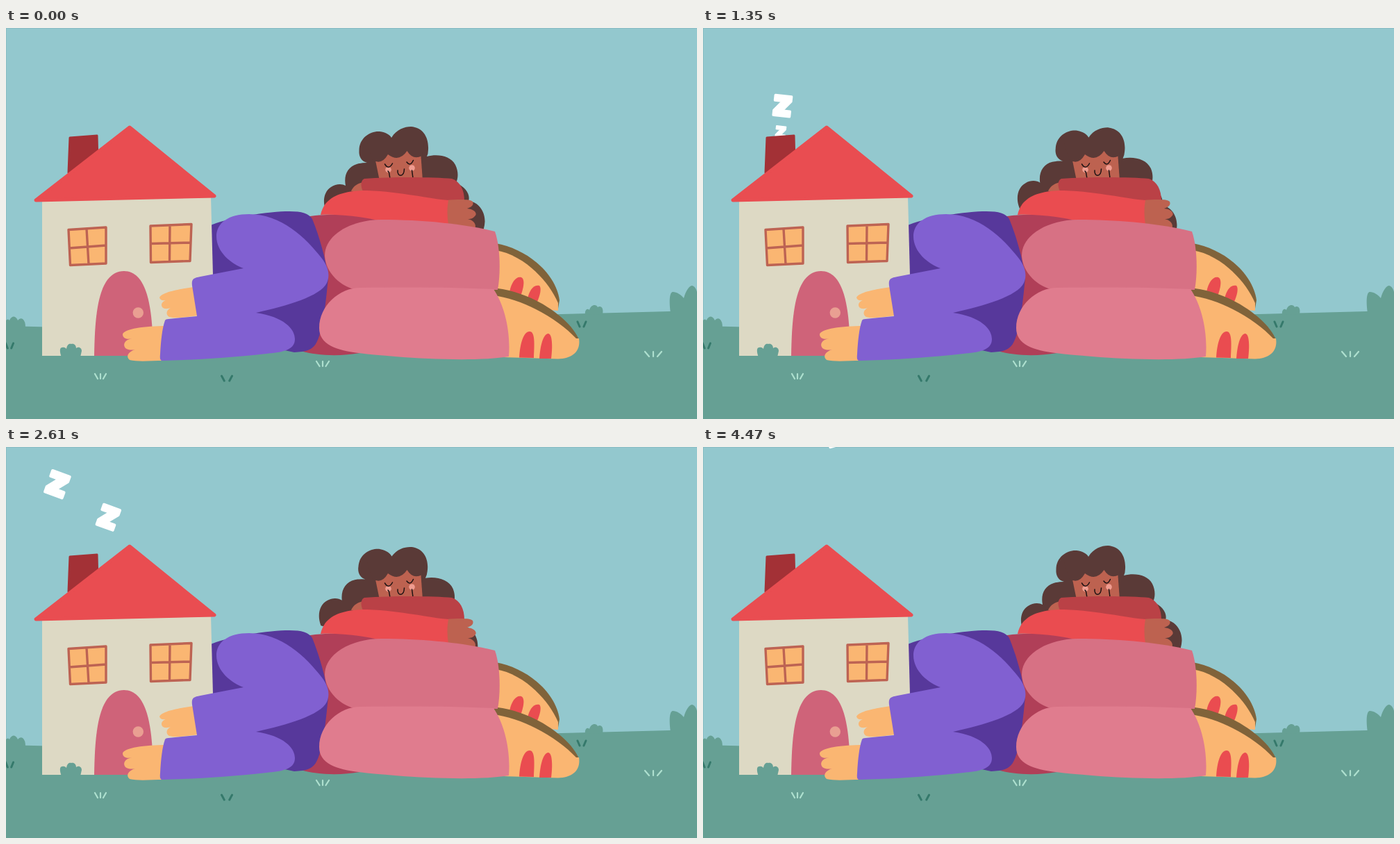
Recreate the animation shown at these times as an HTML page. Size 995 by 563 pixels, loop 4500 ms.

```html
<!DOCTYPE html>
<html lang="en">
<head>
<meta charset="utf-8">
<title>Sleepy house</title>
<style>
html, body { margin: 0; width: 100%; height: 100%; overflow: hidden; background: #93c8ce; }
svg { display: block; width: 100vw; height: 100vh; }
.ground { fill: #66a094; }
.hair { fill: #5a3a37; }
.skin { fill: #bd6250; }
.peach { fill: #fab672; }
.red { fill: #ea4c50; }
.sole { fill: #80633a; }
.line { fill: none; stroke-linecap: round; stroke-linejoin: round; }
.ink { stroke: #1d1213; stroke-width: 1.5; }
.light { stroke: #aee0cf; stroke-width: 2.2; }
.dark { stroke: #35796b; stroke-width: 3; }
.pane { fill: #fab672; stroke: #bd6353; stroke-width: 3.4; stroke-linejoin: round; }
.z { fill: #fff; stroke: #fff; stroke-width: 4; stroke-linejoin: round; }
</style>
</head>
<body>
<svg viewBox="0 0 995 563" preserveAspectRatio="none">
  <rect width="995" height="563" fill="#93c8ce"/>
  <path d="M0 .5H995M.5 0V429" stroke="#86b9c0" fill="none" opacity=".7"/>

  <g class="ground">
    <path d="M0 429L60 430.500L800 412L995 407V563H0Z"/>
    <path d="M0 421Q3 418 5 421Q7 416 11 415.500Q15 416 17 421Q20 417 24 419Q28 422 28 431H0Z"/>
    <path d="M834 413C833 406 837 403 840 406C842 398 850 397 852 402C857 399 861 404 859 412Z"/>
    <path d="M957 410C955 395 955 381 960 380C966 380 972 384 976 389C979 378 984 371 988 371C992 372 994 376 995 380V410Z"/>
  </g>

  <path id="hair" class="hair" d="M508.500 177C508 158 525 148 538 149C547 150 553 154 555 158C562 146 574 142 583 142C600 143 609 157 608 175Q608 181 606 185C622 181 640 184 647 197C652 207 651 217 648 223C662 229 669 240 666 249C680 250 690 264 689.500 279Q689 290 684 297L640 295L462 266C455 252 457 236 468 229C475 224 484 224 489 227C486 212 492 200 505 196Q512 194 520 194C511 192 508 184 508.500 177Z"/>

  <path class="skin" d="M531 186L538 220H600L597 178Q565 170 531 186Z"/>
  <path class="hair" d="M528 190Q541 198 550 182Q566 194 577.500 177Q586 191 599 184L602 166H520Z"/>
  <circle cx="550.500" cy="204" r="4.300" fill="#f09c90"/>
  <circle cx="584.500" cy="201.500" r="4.300" fill="#f09c90"/>
  <path class="line ink" d="M545.500 196Q551 205 556.500 195M577 193Q582 200 586.500 190.500M550 206L551.500 208L553 217M584.500 205L586 216M564 205C563 214 573 216 573.500 203"/>

  <path class="skin" d="M497 235C500 227 508 223 515 222L519 236Z"/>
  <path fill="#ba4146" d="M516 217C560 214 620 215 642 217C654 221 660 233 660 249L637 250C600 247 555 239 514 235C510 227 511 219 516 217Z"/>
  <path class="skin" d="M635 248C650 247 668 246 672 250C674 255 670 258 664 260C676 261 679 268 675 271C672 275 668 275 665 275C674 277 678 283 675 290L635 284Z"/>

  <path class="sole" d="M705 310C751 318 792 354 797 392L795 404L705 395Z"/>
  <path class="peach" d="M705 320C743 326 780 361 795 396L795 407L705 400Z"/>
  <path class="red" d="M725 380C728 365 735 357 742 359C748 362 745 375 741 386Z"/>
  <path class="red" d="M751 390C754 375 762 369 768 371C772 375 768 388 764 396Z"/>
  <path class="sole" d="M698 374C755 377 813 418 825 449L818 452L715 400Z"/>
  <path class="peach" d="M700 385C747 390 797 421 821 447L825 447C828 466 815 476 795 476.500L715 474Z"/>
  <path class="red" d="M739 474.500C740 455 745 437 754 437C762 437 761 455 760 475Z"/>
  <path class="red" d="M768 476C769 460 773 440 781 440C787 441 787 460 785 476Z"/>

  <path fill="#b03f58" d="M430 272C460 267 510 267 545 277L520 466C490 473 450 473 425 465Z"/>
  <path class="red" d="M453 269C458 245 480 234 520 234C570 236 610 246 637 248Q634 265 637 283L540 278C510 271 480 268 453 269Z"/>
  <path fill="#57389b" d="M290 286C320 272 380 264 408 264C426 264 436 267 441 275C451 300 460 330 464 360C460 400 456 438 446 455C440 464 432 466 415 467L290 440Z"/>
  <path fill="#d77184" d="M459 328C459 296 500 276 540 276C600 276 660 282 704 293C711 312 713 350 708 377H505C482 373 460 352 459 328Z"/>
  <path fill="#e07c8e" d="M451 432C451 400 480 374 510 374C570 373 640 373 702 376C717 398 727 435 724 473C690 479 620 478 560 473C500 468 451 466 451 432Z"/>

  <g id="sleep"></g>

  <path d="M92 158L131 155L132 195L90 208Z" fill="#a33136" stroke="#a33136" stroke-width="3" stroke-linejoin="round"/>
  <path fill="#ddd9c4" d="M52 248L295 242L298 356V472H52Z"/>
  <path d="M178 143L300 242L43 248Z" fill="#e94d51" stroke="#e94d51" stroke-width="5" stroke-linejoin="round"/>
  <path class="pane" d="M90 290.500L144 287L144 339L92.500 341.500ZM116 289L119 340M91 317L144 313"/>
  <path class="pane" d="M208 285L267 282.500L265 335.500L208.500 337.500ZM236 284L235.500 336M208 310.500L266 309"/>
  <path fill="#cf6379" d="M127 472C128 418 131 350 170 350C202 350 209 400 211 440V472Z"/>
  <circle cx="190.300" cy="410" r="7.700" fill="#e99f92"/>
  <path class="ground" d="M80 474C77 466 77 460 81 460C84 459 86 461 87 462C88 455 92 454 94 455C98 454 101 457 101 461C105 458 109 461 109 465L107 474Z"/>

  <path class="peach" d="M270 373C250 376 225 380 221 388C222 393 228 393 232 391C224 394 222 399 226 403C230 405 234 404 237 403C230 407 230 413 235 416C245 419 260 416 277 414Z"/>
  <path class="peach" d="M231 429C200 429 170 433 168 441C168 447 174 449 182 447C170 449 168 456 172 461C176 464 182 464 186 463C176 466 172 473 178 478C190 481 210 479 226 479Z"/>
  <path fill="#8160d1" d="M303 300C303 281 320 268 350 268C396 268 432 302 455 332C464 344 467 356 462 367C453 386 405 400 360 410C400 416 416 433 416 448C416 465 395 467 375 469C320 475 270 478 224 479Q221 478 222 470C223 450 225 432 229 421Q230 419 234 419L275 415L268 371C267 362 269 360 280 358L342 346C325 340 303 323 303 300Z"/>

  <path id="lightGrass" class="line light"/>
  <path id="darkGrass" class="line dark"/>
</svg>
<script>
const LOOP = 4500;
const byId = id => document.getElementById(id);
const hair = byId('hair');

// Cosine wave that peaks at the given time.
const wave = (t, peak, period) => Math.cos(2 * Math.PI * (t - peak) / period);

// Grass blades that fan out from a foot point.
function tuft(x, y, count, spread) {
  let d = '';
  for (let i = 0; i < count; i++) {
    const k = i - (count - 1) / 2;
    d += `M${x + k * spread} ${y - 7}L${x + k * spread / 2} ${y}`;
  }
  return d;
}
byId('lightGrass').setAttribute('d',
  tuft(136, 505, 3, 8) + tuft(456, 487, 3, 9) + tuft(932, 473, 3, 12));
byId('darkGrass').setAttribute('d',
  tuft(318, 508, 2, 15) + tuft(829, 430, 2, 12) + tuft(5, 461, 2, 11));

// Each letter leaves the chimney after its delay and sways around mid.
const letters = [
  { delay: 0, mid: 97.5, swing: 26, peak: 950, period: 2920 },
  { delay: 900, mid: 155, swing: 44, peak: 4000, period: 5000 }
];
for (const z of letters) {
  z.node = document.createElementNS('http://www.w3.org/2000/svg', 'path');
  z.node.setAttribute('class', 'z');
  z.node.setAttribute('d', 'M-12.500-15.500H12.500V-8L0 7.500H12.500V15.500H-12.500V8L0-7.500H-12.500Z');
  byId('sleep').append(z.node);
}

function draw(t) {
  hair.setAttribute('transform', `rotate(${2.6 * (1 - wave(t, 0, LOOP))} 560 162)`);
  const tilt = 2.5 - 19 * wave(t, 80, LOOP);
  for (const z of letters) {
    const age = Math.max(0, t - z.delay);
    const x = z.mid + z.swing * wave(t, z.peak, z.period);
    const y = 187 - .0545 * age + 13 * wave(age, 2200, 3200);
    const size = 1.06 * (1 - Math.exp(-age / 650));
    z.node.setAttribute('transform', `translate(${x} ${y}) rotate(${tilt}) scale(${size})`);
  }
}

const start = performance.now();
function tick() {
  draw((performance.now() - start) % LOOP);
  requestAnimationFrame(tick);
}
draw(0);
requestAnimationFrame(tick);
</script>
</body>
</html>
```
